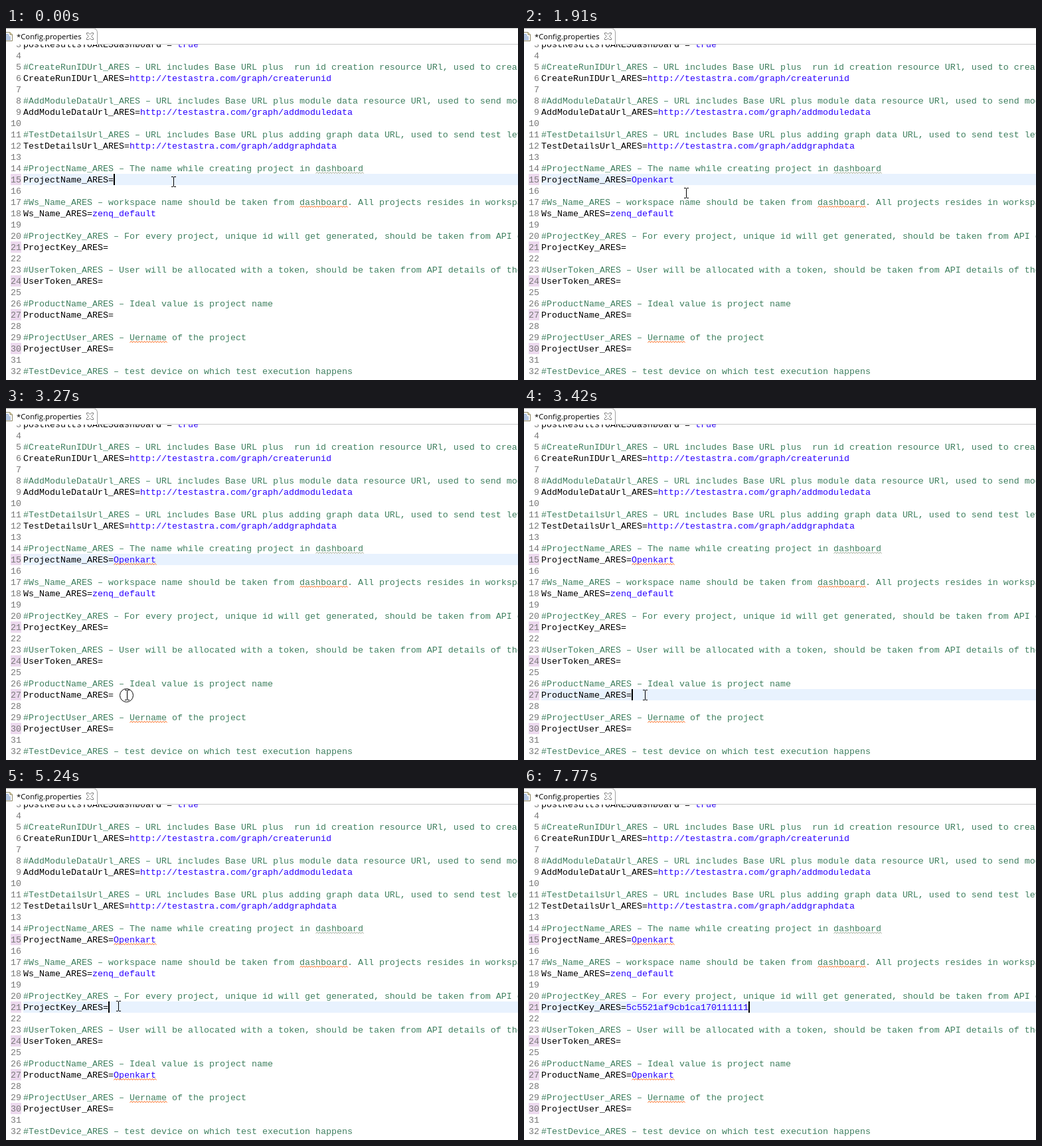
Recreate the animation shown at these times as an HTML page. Size 771 by 531 pixels, loop 8000 ms.

```html
<!DOCTYPE html>
<html lang="en">
<head>
<meta charset="utf-8">
<title>Config.properties</title>
<style>
  html, body { margin: 0; width: 100%; height: 100%; overflow: hidden; background: #fff; }
  svg { display: block; }
  text { white-space: pre; }
  .code { font: 13.3333px "Liberation Mono", "Courier New", monospace; }
  .tab { font: 11.3px "Open Sans", "Noto Sans", sans-serif; fill: #000; }
  .number { fill: #787878; text-anchor: end; }
  .comment { fill: #3f7f5f; }
  .value { fill: #2a00ff; }
</style>
</head>
<body>
<svg width="771" height="531" viewBox="0 0 771 531" xmlns="http://www.w3.org/2000/svg">
  <rect width="771" height="531" fill="#fff"/>
  <rect id="highlight" x="26" width="745" height="17" fill="#e8f2fe"/>
  <g id="lines" class="code"></g>
  <g id="tabBar">
    <rect width="771" height="25" fill="#fff"/>
    <path d="M0 .5H771M138 24.500H771" stroke="#c8c8c8"/>
    <path d="M0 .5H131Q137.500 1 137.500 7V24.500" fill="none" stroke="#a0a0a0"/>
    <path d="M-2 6.500H6L9.500 10V19.500H-2Z" fill="#fff" stroke="#8b8462"/>
    <path d="M6 6.500V10H9.500" fill="#e8d9a4" stroke="#8b8462"/>
    <path d="M0 9.500H4M0 11.500H5M0 13.500H7M0 15.500H7M0 17.500H7" stroke="#6a8fc4"/>
    <text class="tab" x="16" y="17">*Config.properties</text>
    <path d="M121.500 7.500h3l2 2 2-2h3v2l-3 3 3 3v2h-3l-2-2-2 2h-3v-2l3-3-3-3z" fill="#fff" stroke="#777"/>
  </g>
  <rect id="caret" width="2" height="17"/>
  <g id="pointer">
    <path d="M0 .5h3m1 0h3M3.500 1v14M0 15.500h3m1 0h3" fill="none" stroke="#000"/>
    <circle id="ring" cx="2.500" cy="8.500" r="10" fill="none" stroke="#000"/>
  </g>
</svg>
<script>
const LOOP = 8000, CHAR = 8, LEFT = 26, PITCH = 17;
const SAMPLE = 136;                        // pointer refresh, ms
const BLINK_ON = 430, BLINK_PERIOD = 1250; // caret, counted from the last action
const RING = 150;
const ORANGE = "#fd5702", GRAY = "#94a08c";

const $ = id => document.getElementById(id);
const lineTop = n => 220 + PITCH * (n - 15);
const baseline = n => lineTop(n) + 13;
const column = c => LEFT + CHAR * c;
const show = (node, on) => node.setAttribute("visibility", on ? "inherit" : "hidden");

function add(tag, attrs, content = "") {
  const node = document.createElementNS("http://www.w3.org/2000/svg", tag);
  for (const key in attrs) node.setAttribute(key, attrs[key]);
  node.textContent = content;
  return $("lines").appendChild(node);
}

function squiggle(line, col, chars, stroke = ORANGE) {
  const start = `M${column(col) + 0.5} ${baseline(line) + 3.5}`;
  return add("path", { d: start + "l2-2l2 2".repeat(chars * CHAR / 4), fill: "none", stroke });
}

const source = `postResultsToARESdashboard = true

#CreateRunIDUrl_ARES – URL includes Base URL plus  run id creation resource URl, used to create
CreateRunIDUrl_ARES=http://testastra.com/graph/createrunid

#AddModuleDataUrl_ARES – URL includes Base URL plus module data resource URl, used to send module
AddModuleDataUrl_ARES=http://testastra.com/graph/addmoduledata

#TestDetailsUrl_ARES – URL includes Base URL plus adding graph data URL, used to send test level
TestDetailsUrl_ARES=http://testastra.com/graph/addgraphdata

#ProjectName_ARES – The name while creating project in dashboard
ProjectName_ARES=

#Ws_Name_ARES – workspace name should be taken from dashboard. All projects resides in workspace
Ws_Name_ARES=zenq_default

#ProjectKey_ARES – For every project, unique id will get generated, should be taken from API details
ProjectKey_ARES=

#UserToken_ARES – User will be allocated with a token, should be taken from API details of the
UserToken_ARES=

#ProductName_ARES – Ideal value is project name
ProductName_ARES=

#ProjectUser_ARES – Uername of the project
ProjectUser_ARES=

#TestDevice_ARES – test device on which test execution happens`.split("\n");

const fields = {}; // empty settings by line number
source.forEach((line, i) => {
  const n = i + 3, y = baseline(n), empty = line.endsWith("=");
  if (empty) add("rect", { x: 7, y: lineTop(n), width: 16, height: PITCH, fill: "#ecd9ee" });
  add("text", { x: 23, y, class: "number" }, n);
  if (line.startsWith("#")) {
    add("text", { x: LEFT, y, class: "comment" }, line);
    const typo = line.match(/dashboard|Uername/);
    if (typo) squiggle(n, typo.index, typo[0].length, n === 14 ? GRAY : ORANGE);
  } else {
    const [key, value] = line.split(/(?<== ?)(?=[^ ]|$)/);
    add("text", { x: LEFT, y }, key);
    const node = add("text", { x: column(key.length), y, class: "value" }, value);
    if (empty) fields[n] = { node, start: key.length };
  }
});

// Clicks into a line, pastes of text, and one loss of focus.
const actions = [
  { at: 0, line: 15 },
  { at: 930, line: 15 },
  { at: 1480, line: 15, text: "Openkart", marked: 2190 },
  { at: 3420, line: 27 },
  { at: 3670, line: 27, text: "Openkart", marked: 4650 },
  { at: 4100, line: 27, blur: true },
  { at: 5240, line: 21 },
  { at: 6480, line: 21, text: "5c5521af9cb1ca170111111" }
];
const pastes = actions.filter(a => a.text);
for (const p of pastes)
  if (p.marked) p.mark = squiggle(p.line, fields[p.line].start, p.text.length);

const ringStarts = [1050, 3270];
const pointerVisible = t => t < 4220 || (t >= 5240 && t < 7490);
const pointerKeys = [
  { at: 1860, x: 249, y: 224 },
  { at: 2090, x: 161, y: 402 },
  { at: 2440, x: 161, y: 402 },
  { at: 2720, x: 179, y: 425 },
  { at: 4220, x: 179, y: 425 },
  { at: 5100, x: 166, y: 321 },
  { at: 6800, x: 166, y: 321 },
  { at: 7003, x: 688, y: 463 },
  { at: 7072, x: 688, y: 463 },
  { at: 7344, x: 688, y: 515 }
];

function pointerAt(t) {
  const time = Math.floor(t / SAMPLE) * SAMPLE;
  const from = pointerKeys.findLast(k => k.at <= time) || pointerKeys[0];
  const to = pointerKeys.find(k => k.at > time) || from;
  const p = Math.max(0, (time - from.at) / (to.at - from.at || 1));
  const eased = p * p * (3 - 2 * p);
  return ["x", "y"].map(axis => Math.round(from[axis] + (to[axis] - from[axis]) * eased));
}

function render(t) {
  const action = actions.findLast(a => a.at <= t);
  $("highlight").setAttribute("y", lineTop(action.line));

  for (const p of pastes) {
    fields[p.line].node.textContent = t >= p.at ? p.text : "";
    if (p.mark) show(p.mark, t >= p.marked);
  }

  const { start, node } = fields[action.line];
  $("caret").setAttribute("x", column(start + node.textContent.length));
  $("caret").setAttribute("y", lineTop(action.line));
  show($("caret"), !action.blur && (t - action.at) % BLINK_PERIOD < BLINK_ON);

  $("pointer").setAttribute("transform", `translate(${pointerAt(t)})`);
  show($("pointer"), pointerVisible(t));
  show($("ring"), ringStarts.some(s => t >= s && t < s + RING));
}

const startTime = performance.now();
function tick() {
  render((performance.now() - startTime) % LOOP);
  requestAnimationFrame(tick);
}
tick();
</script>
</body>
</html>
```
